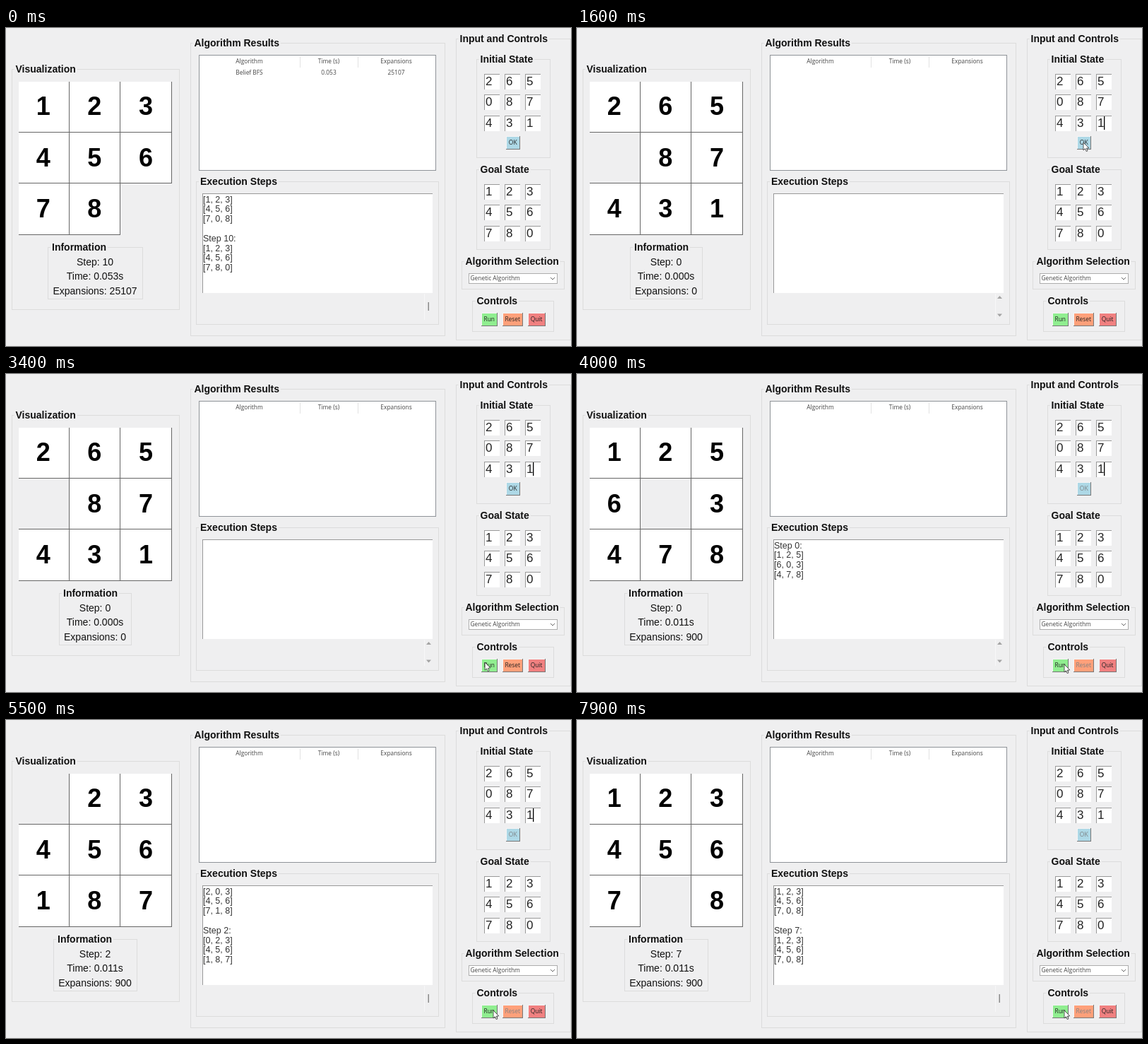
Write an HTML page with a canvas that moves like this. It is 800 by 450 pixels and loops after 8000 ms.

```html
<!DOCTYPE html>
<html lang="en">
<head>
<meta charset="utf-8">
<title>Puzzle solver</title>
<style>
html, body { margin: 0; width: 100%; height: 100%; overflow: hidden; background: #efeff0; }
canvas { display: block; width: 800px; height: 450px; }
</style>
</head>
<body>
<canvas id="stage" width="800" height="450"></canvas>
<script>
const ctx = document.getElementById('stage').getContext('2d');
const LOOP = 8000, CLICK_OK = 1500, CLICK_RUN = 3950, STEP_TIME = 525;
const BG = '#efeff0', INK = '#111';
const SANS = '"Liberation Sans", Arial, sans-serif';
const UI = '"Open Sans", "Noto Sans", sans-serif';
const START = '265087431', GOAL = '123456780', BEFORE_GOAL = '123456708';
const STATES = ['125603478', '203456718', '023456187', '123456078',
  '123456078', '123456708', '123456708', '123456708'];

function text(s, x, y, size, { align = 'left', bold = false, font = SANS, color = INK } = {}) {
  ctx.font = `${bold ? 'bold ' : ''}${size}px ${font}`;
  ctx.textAlign = align;
  ctx.fillStyle = color;
  ctx.fillText(s, x, y + size * 0.345);
}

function ui(s, x, y, align = 'center', color = '#444') {
  text(s, x, y, 8.4, { align, font: UI, color });
}

function box(x, y, w, h, fill) {
  ctx.fillStyle = fill;
  ctx.fillRect(x, y, w, h);
}

function outline(x1, y1, x2, y2, color) {
  ctx.strokeStyle = color;
  ctx.lineWidth = 1;
  ctx.strokeRect(x1 + 0.5, y1 + 0.5, x2 - x1, y2 - y1);
}

function polygon(points, fill, stroke) {
  ctx.beginPath();
  points.forEach(([x, y]) => ctx.lineTo(x, y));
  ctx.closePath();
  ctx.fillStyle = fill;
  ctx.fill();
  if (stroke) {
    ctx.strokeStyle = stroke;
    ctx.lineWidth = 0.8;
    ctx.stroke();
  }
}

function group(title, x1, y1, x2, y2, indent = 5.5) {
  outline(x1, y1, x2, y2, '#dcdcdc');
  ctx.font = `bold 14px ${SANS}`;
  box(x1 + indent - 2, y1 - 6, ctx.measureText(title).width + 4, 14, BG);
  text(title, x1 + indent, y1, 14, { bold: true });
}

function sunken(x, y, w, h) {
  box(x, y, w, h, '#fff');
  box(x, y, w, 1, '#999');
  box(x, y, 1, h, '#999');
}

function button(label, x, y, w, h, color, disabled) {
  box(x, y, w, h, '#777');
  box(x, y, w - 1, h - 1, '#f5f5f5');
  box(x + 1, y + 1, w - 2, h - 2, color);
  ui(label, x + w / 2 - 0.3, y + h / 2 - 0.5, 'center', disabled ? '#7d8184' : '#222');
}

// Tiles share their edge lines; the outer left and top edges are cut off.
function board(state) {
  const xs = [17, 89, 161, 234], ys = [75, 147, 219, 292];
  ctx.save();
  ctx.beginPath();
  ctx.rect(18, 76, 218, 218);
  ctx.clip();
  [...state].forEach((d, i) => {
    if (d === '0') return;
    const c = i % 3, r = Math.floor(i / 3);
    box(xs[c], ys[r], xs[c + 1] - xs[c], ys[r + 1] - ys[r], '#fff');
  });
  [...state].forEach((d, i) => {
    if (d === '0') return;
    const c = i % 3, r = Math.floor(i / 3);
    outline(xs[c], ys[r], xs[c + 1], ys[r + 1], '#666');
    text(d, 52.7 + c * 72.6, 110.5 + r * 72.6, 36, { align: 'center', bold: true, color: '#000' });
  });
  ctx.restore();
}

function information(step, time, expansions) {
  const lines = [`Step: ${step}`, `Time: ${time}s`, `Expansions: ${expansions}`];
  ctx.font = `14px ${SANS}`;
  const half = Math.round(ctx.measureText(lines[2]).width / 2 + 7.5);
  group('Information', 126 - half, 310, 126 + half, 383, 6);
  lines.forEach((s, i) => text(s, 126, 331 + i * 20.5, 14, { align: 'center' }));
}

function matrixLines(state) {
  return [0, 3, 6].map(i => `[${[...state.slice(i, i + 3)].join(', ')}]`);
}

function stepLog(step, state, previous) {
  const lines = [`Step ${step}:`, ...matrixLines(state)];
  if (previous) lines.unshift(...matrixLines(previous), '');
  lines.forEach((s, i) => text(s, 279, 242.2 + i * 13.83, 12.5, { color: '#333' }));
}

function scrollbar(scrolled) {
  box(592, 376, 1, 37, '#f8f8f8');
  if (scrolled) {
    box(597.5, 388, 1.5, 12, '#8a8a8a');
  } else {
    polygon([[595, 383], [598.5, 379], [602, 383]], '#a3a3a3');
    polygon([[595, 404.5], [598.5, 408.5], [602, 404.5]], '#a3a3a3');
  }
}

function entries(state, top) {
  [...state].forEach((d, i) => {
    const x = 677 + (i % 3) * 29, y = top + Math.floor(i / 3) * 29.5;
    sunken(x, Math.floor(y), 22, 22);
    text(d, x + 2, y + 9.8, 17, { color: '#222' });
  });
}

function results(solved) {
  box(273, 38, 335, 164, '#fff');
  outline(273, 38, 608, 201, '#8f9398');
  box(416, 40, 1, 16, '#e2e2e2');
  box(498, 40, 1, 16, '#e2e2e2');
  const columns = [344.5, 457, 552.5];
  ['Algorithm', 'Time (s)', 'Expansions'].forEach((s, i) => ui(s, columns[i], 47));
  if (solved) ['Belief BFS', '0.053', '25107'].forEach((s, i) => ui(s, columns[i], 63));
}

function combobox() {
  box(655, 347, 126, 15, '#fff');
  outline(655, 347, 780, 361, '#adadad');
  ui('Genetic Algorithm', 657.5, 354.5, 'left');
  ctx.beginPath();
  ctx.moveTo(771, 353);
  ctx.lineTo(774, 356);
  ctx.lineTo(777, 353);
  ctx.strokeStyle = '#555';
  ctx.lineWidth = 0.9;
  ctx.stroke();
}

// Pointer stops: time, x, y
const PATH = [[1100, 806, 230], [1400, 717, 162], [1700, 717, 162], [2350, 471, 358],
  [2800, 471, 358], [3500, 690, 411], [LOOP, 690, 411]];

function pointer(t) {
  const i = PATH.findIndex(p => p[0] > t);
  if (i < 1) return;
  const [t0, x0, y0] = PATH[i - 1], [t1, x1, y1] = PATH[i];
  const u = (t - t0) / (t1 - t0), e = u * u * (3 - 2 * u);
  const x = x0 + (x1 - x0) * e, y = y0 + (y1 - y0) * e;
  if (x > 278 && x < 604 && y > 235 && y < 375) {
    box(x - 0.4, y - 5, 1, 11, '#555');
    box(x - 2.5, y - 5.5, 5.2, 1, '#555');
    box(x - 2.5, y + 5, 5.2, 1, '#555');
    return;
  }
  const shape = [[0, 0], [0, 11], [2.5, 8.7], [4.2, 12.6], [6, 11.8], [4.4, 8.1], [7.8, 7.8]];
  polygon(shape.map(([dx, dy]) => [x + dx, y + dy]), '#fff', '#333');
}

function draw(t) {
  box(0, 0, 800, 450, BG);
  const solved = t < CLICK_OK, running = t >= CLICK_RUN;
  const step = running ? Math.min(7, Math.floor((t - CLICK_RUN) / STEP_TIME)) : 0;

  group('Visualization', 8, 58, 245, 398);
  group('Algorithm Results', 261, 21, 621, 435);
  group('Execution Steps', 269, 217, 612, 419, 6);
  group('Input and Controls', 637, 15, 799, 441);
  group('Initial State', 666, 44, 770, 183);
  group('Goal State', 666, 200, 770, 313);
  group('Algorithm Selection', 645, 330, 790, 369);
  group('Controls', 660, 386, 775, 429, 6.5);

  results(solved);
  sunken(278, 234, 326, 141);
  scrollbar(solved || step > 0);

  if (solved) {
    board(GOAL);
    information(10, '0.053', 25107);
    stepLog(10, GOAL, BEFORE_GOAL);
  } else if (running) {
    board(STATES[step]);
    information(step, '0.011', 900);
    stepLog(step, STATES[step], STATES[step - 1]);
  } else {
    board(START);
    information(0, '0.000', 0);
  }

  entries(START, 65);
  entries(GOAL, 221);
  const blink = t % 890;
  if (blink >= 140 && blink < 740) box(746, 125, 1.3, 19, '#000');

  button('OK', 708, 153, 20, 19, '#add8e6', running);
  button('Run', 673, 403, 23, 19, '#90ee90');
  button('Reset', 703, 403, 29, 19, '#ffa07a', running);
  button('Quit', 739, 403, 25, 19, '#f08080');
  combobox();
  pointer(t);
}

const began = performance.now();
function frame() {
  draw((performance.now() - began) % LOOP);
  requestAnimationFrame(frame);
}
frame();
</script>
</body>
</html>
```
